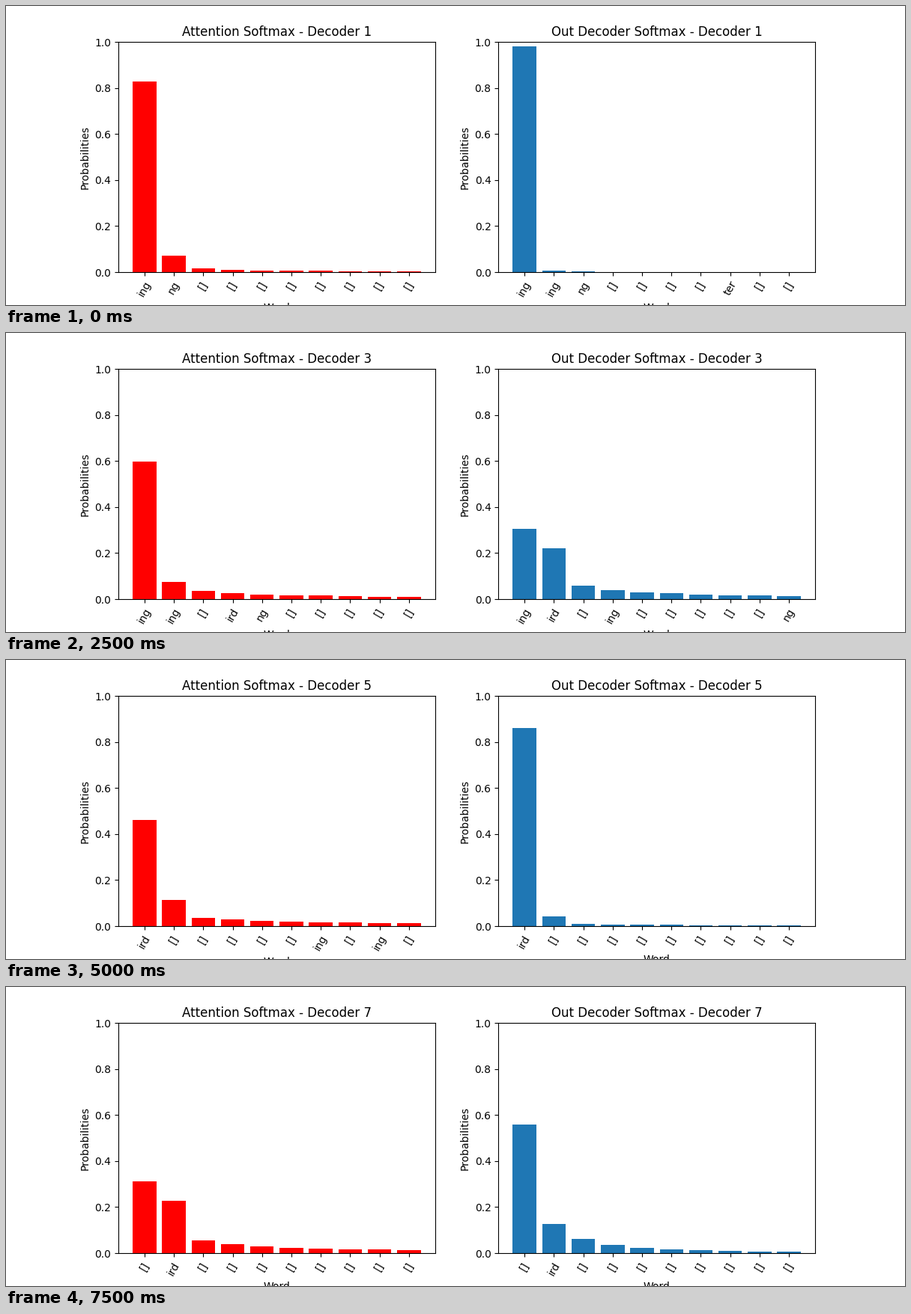
Write a matplotlib script that moves like this. It is 1200 px wide and 400 px high and loops after 8000 ms.

```python
import matplotlib.pyplot as plt
import numpy as np
from matplotlib.animation import FuncAnimation

plt.rcParams["font.family"] = "DejaVu Sans"

BARS = 10
HOLD = 5  # frames per decoder step
INTERVAL = 250
FRAMES = 32
EMPTY = "[]"
KEY_RANKS = [1, 2, 3, BARS]

# Per decoder step: the leading words (the rest are empty tokens)
# and the probabilities at the key ranks.
ATTENTION = [
    ("ing ng", [.828, .071, .016, .003]),
    ("ing ing ng", [.984, .0033, .0005, .0001]),
    ("ing ing [] ird ng", [.597, .075, .036, .01]),
    ("ird ing [] ing [] [] ing", [.412, .188, .055, .01]),
    ("ird [] [] [] [] [] ing [] ing", [.461, .114, .036, .013]),
    ("[] ird", [.312, .292, .088, .01]),
    ("[] ird", [.312, .227, .055, .013]),
]
OUTPUT = [
    ("ing ing ng [] [] [] [] ter", [.981, .0065, .003, .0001]),
    ("ing ing [] ng [] [] [] [] [] ird", [.542, .068, .049, .013]),
    ("ing ird [] ing [] [] [] [] [] ng", [.305, .221, .058, .013]),
    ("ird [] [] [] ing", [.218, .104, .071, .026]),
    ("ird", [.86, .042, .01, .003]),
    ("ird", [.312, .175, .071, .02]),
    ("[] ird", [.558, .127, .062, .0065]),
]


def fill_words(text):
    words = text.split()
    return words + [EMPTY] * (BARS - len(words))


def fill_probs(keys):
    """Power-law decay between the key ranks."""
    ranks = np.arange(1, BARS + 1)
    return np.exp(np.interp(np.log(ranks), np.log(KEY_RANKS), np.log(keys)))


class Panel:
    def __init__(self, ax, title, color, steps):
        self.ax, self.title, self.steps = ax, title, steps
        self.bars = ax.bar(range(BARS), [0] * BARS, color=color)
        ax.set_ylim(0, 1)
        ax.set_xlabel("Word")
        ax.set_ylabel("Probabilities")

    def show(self, step):
        words, keys = self.steps[step]
        for bar, p in zip(self.bars, fill_probs(keys)):
            bar.set_height(p)
        self.ax.set_xticks(range(BARS), fill_words(words), rotation=60)
        self.ax.set_title(f"{self.title} - Decoder {step + 1}")


fig, (left, right) = plt.subplots(1, 2, figsize=(12, 4), dpi=100)
panels = [
    Panel(left, "Attention Softmax", "red", ATTENTION),
    Panel(right, "Out Decoder Softmax", "tab:blue", OUTPUT),
]


def update(frame):
    for panel in panels:
        panel.show(frame // HOLD)


anim = FuncAnimation(fig, update, frames=FRAMES, interval=INTERVAL,
                     init_func=lambda: update(0), repeat=True, repeat_delay=0)
plt.show()
```
